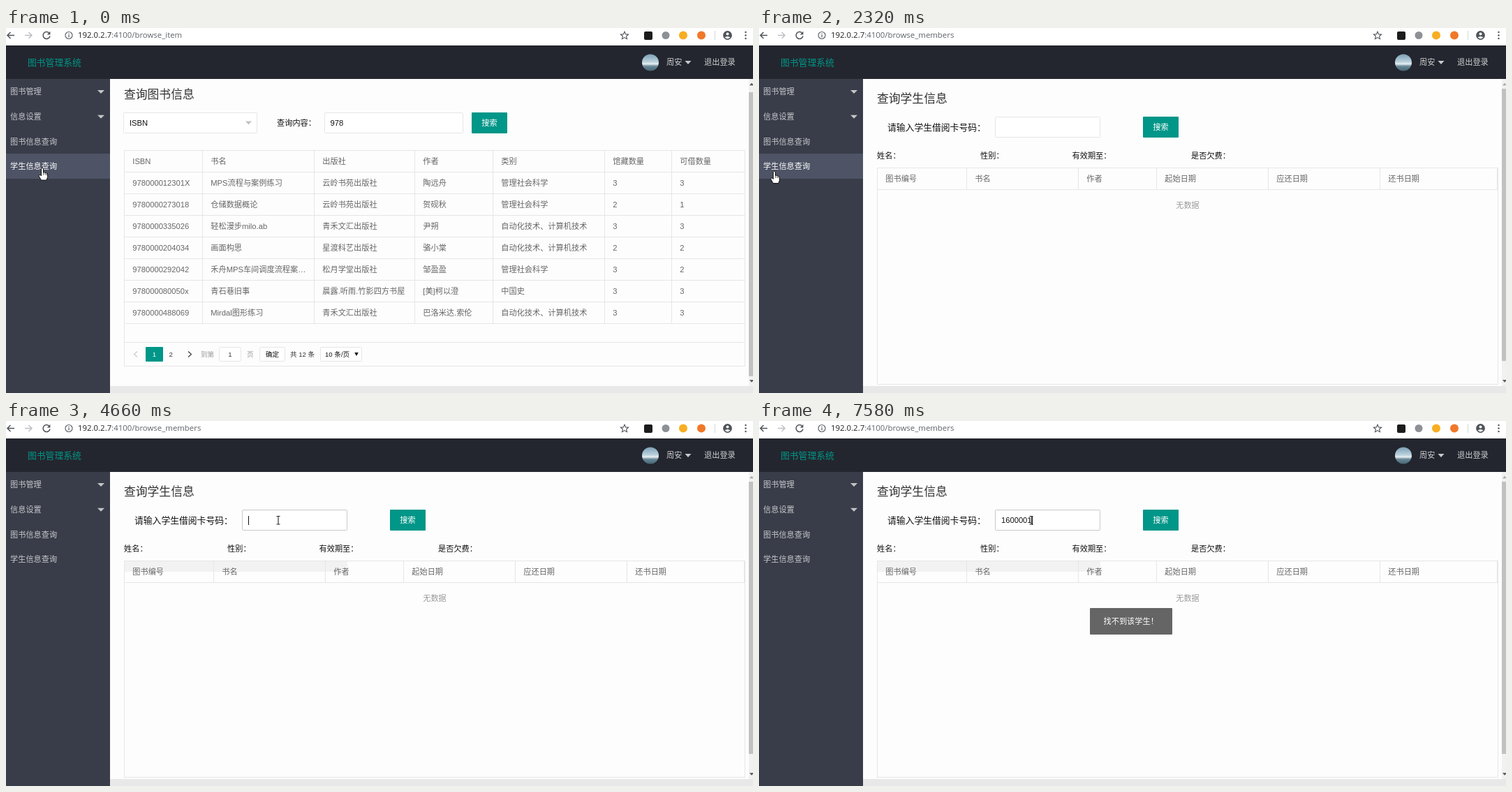
An HTML page for the animation above (8 s loop, 1070 by 523 pixels).

```html
<!DOCTYPE html>
<html lang="zh-CN">
<head>
<meta charset="utf-8">
<title>图书管理系统</title>
<style>
  html, body { margin: 0; width: 100%; height: 100%; overflow: hidden; background: #fdfdfd; }
  svg { display: block; }
  text { font-family: "Liberation Sans", "Noto Sans CJK SC", "Noto Sans CJK", sans-serif; white-space: pre; }
  .url { font-family: "Open Sans", "Noto Sans", sans-serif; }
</style>
</head>
<body>
<svg id="stage" width="1070" height="523" viewBox="0 0 1070 523"></svg>
<script>
const LOOP = 8000;
const LINE = '#e6e6e6', GREEN = '#009688', SIZE = 11.2;

// Drawing helpers; text is placed by its vertical centre.
const rect = (x, y, w, h, fill, extra = '') =>
  `<rect x="${x}" y="${y}" width="${w}" height="${h}" fill="${fill}" ${extra}/>`;
const text = (x, cy, s, fill = '#666', size = SIZE, extra = '') =>
  `<text x="${x}" y="${cy + size * 0.37}" font-size="${size}" fill="${fill}" ${extra}>${s}</text>`;
const mid = (x, cy, s, fill, size) => text(x, cy, s, fill, size, 'text-anchor="middle"');
const box = (x, y, w, h, id = '') =>
  rect(x + .5, y + .5, w - 1, h - 1, '#fff', `rx="1" stroke="${LINE}" ${id}`);
const frame = (x, y, w, h) => rect(x + .5, y + .5, w - 1, h - 1, 'none', `stroke="${LINE}"`);
const path = (d, stroke, w = 1.5, fill = 'none') =>
  `<path d="${d}" stroke="${stroke}" stroke-width="${w}" fill="${fill}"/>`;
const down = (x, y, w, h, fill) =>
  `<path d="M${x - w / 2} ${y - h / 2}h${w}l${-w / 2} ${h}z" fill="${fill}"/>`;
const up = (x, y, w, h, fill) => down(x, y, w, -h, fill);
const dot = (x, y, r, fill, extra = '') => `<circle cx="${x}" cy="${y}" r="${r}" fill="${fill}" ${extra}/>`;
const group = (id, s) => `<g id="${id}">${s}</g>`;
const button = (x, y) => rect(x, y, 51, 30, GREEN, 'rx="1"') + mid(x + 25.5, y + 15, '搜索', '#fff');
const url = (id, page) =>
  `<text id="${id}" class="url" x="103" y="14.3" font-size="11.4" fill="#202124">192.0.2.7<tspan fill="#5f6368">:4100/${page}</tspan></text>`;

function toolbar() {
  return rect(0, 0, 1070, 25, '#fff') +
    path('M12 10.5H2M6.5 6L2 10.5L6.5 15', '#50545a') +
    path('M27 10.5H37M32.5 6L37 10.5L32.5 15', '#bdc0c4') +
    group('reload', path('M62.2 7.6A5 5 0 1 0 63 11.5', '#50545a') +
      '<path d="M63.4 4.8v4.6h-4.6z" fill="#50545a"/>') +
    group('stop', path('M54 6.2L62.4 14.6M62.4 6.2L54 14.6', '#50545a')) +
    dot(90, 10.5, 5, 'none', 'stroke="#5f6368" stroke-width="1.2"') +
    rect(89.4, 9.7, 1.3, 3.6, '#5f6368') + rect(89.4, 7.6, 1.3, 1.3, '#5f6368') +
    url('urlBooks', 'browse_item') + url('urlStudents', 'browse_members') +
    path('M886 5.2l1.6 3.7 4 .3-3 2.6.9 3.9-3.5-2.1-3.5 2.1.9-3.9-3-2.6 4-.3z', '#50545a', 1.1) +
    rect(914, 5, 12, 12, '#1c1c1c', 'rx="2"') +
    dot(945, 10.5, 5.5, '#8d9094') + dot(970, 10.5, 6, '#f8ae22') + dot(996, 10.5, 6, '#f0782a') +
    rect(1015, 4, 1, 13, '#d5d7da') +
    dot(1033.5, 10.5, 6.4, '#50545a') + dot(1033.5, 8.5, 2, '#fff') +
    '<path d="M1029.5 13.6q4-3 8 0q-4 3.6-8 0z" fill="#fff"/>' +
    [6, 10.5, 15].map(y => dot(1059.5, y, 1.2, '#50545a')).join('');
}

function header() {
  return rect(0, 25, 1070, 48, '#23262e') +
    text(31, 49, '图书管理系统', GREEN, 12.8) +
    `<linearGradient id="sky" x2="0" y2="1">
      <stop offset="0" stop-color="#7c9fb5"/><stop offset=".45" stop-color="#b9d0dc"/>
      <stop offset=".58" stop-color="#e6eef1"/><stop offset=".72" stop-color="#688797"/>
      <stop offset="1" stop-color="#476675"/></linearGradient>` +
    dot(923, 49.5, 12, 'url(#sky)') +
    text(946, 49, '周安', '#d0d1d3') + down(977, 49.5, 9, 5, '#c8c9cb') +
    text(1000, 49, '退出登录', '#d0d1d3');
}

function sidebar() {
  const items = ['图书管理', '信息设置', '图书信息查询', '学生信息查询'];
  return rect(0, 73, 149, 450, '#393d49') +
    rect(0, 180, 149, 36, '#4e5465', 'id="hover"') +
    items.map((s, i) => text(6, 91 + i * 35.7, s, '#c8c9cc', SIZE, `id="item${i}"`) +
      (i < 2 ? down(136, 91.5 + i * 35.7, 10, 5, '#c4c5c8') : '')).join('');
}

function scrollbar(y, h, upFill) {
  return rect(1064, 73, 6, 440, '#f1f1f1') + rect(1064, y, 6, h, '#c1c1c1') +
    up(1068, 80.5, 6, 3.5, upFill) + down(1068, 506, 6, 3.5, '#505050');
}

function pager() {
  const t = (x, s, fill = '#333') => text(x, 467.5, s, fill, 9.6);
  return path('M188 463.5L183.5 467.5L188 471.5', '#c8c8c8', 1.1) +
    rect(200, 457, 25, 21, GREEN, 'rx="1"') + mid(212.5, 467.5, '1', '#fff', 9.6) +
    t(233.5, '2') + path('M261 463.5L265.5 467.5L261 471.5', '#333', 1.1) +
    t(279, '到第', '#999') + box(305, 457, 32, 21) + mid(321, 467.5, '1', '#333', 9.6) +
    t(345, '页', '#999') + box(363, 457, 37, 21) + mid(381.5, 467.5, '确定', '#111', 9.6) +
    t(407, '共 12 条') + box(450, 457, 60, 21) + t(457, '10 条/页', '#111') +
    down(502, 467.5, 5.5, 5, '#111');
}

function booksPage() {
  const cols = [169, 281, 441, 585, 697, 857, 953];
  const social = '管理社会科学', auto = '自动化技术、计算机技术';
  const rows = [
    ['ISBN', '书名', '出版社', '作者', '类别', '馆藏数量', '可借数量'],
    ['978000012301X', 'MPS流程与案例练习', '云岭书苑出版社', '陶远舟', social, 3, 3],
    ['9780000273018', '仓储数据概论', '云岭书苑出版社', '贺砚秋', social, 2, 1],
    ['9780000335026', '轻松漫步milo.ab', '青禾文汇出版社', '尹朔', auto, 3, 3],
    ['9780000204034', '画面构思', '星渡科艺出版社', '骆小棠', auto, 2, 2],
    ['9780000292042', '禾舟MPS车间调度流程案…', '松月学堂出版社', '邹盈盈', social, 3, 2],
    ['978000080050x', '青石巷旧事', '晨露.听雨.竹影四方书屋', '[美]柯以澄', '中国史', 3, 3],
    ['9780000488069', 'Mirdal图形练习', '青禾文汇出版社', '巴洛米达.索伦', auto, 3, 3],
  ];
  return text(169, 95, '查询图书信息', '#333', 16.8) +
    box(168, 121, 192, 30) + text(177, 136, 'ISBN', '#111') + down(347.5, 136, 9, 5, '#c2c2c2') +
    text(388, 136, '查询内容：', '#111') + box(456, 121, 199, 30) + text(464.5, 136, '978', '#111') +
    button(667, 121) +
    frame(169, 175, 890, 310) +
    rows.map((row, r) => rect(169, 206 + r * 31, 889, 1, LINE) +
      row.map((s, c) => text(cols[c] + 12.3, 191 + r * 31, s)).join('')).join('') +
    cols.slice(1).map(x => rect(x, 175, 1, 249, LINE)).join('') +
    rect(169, 450, 889, 1, LINE) + pager() + scrollbar(92, 407, '#505050');
}

function studentsPage() {
  const cols = [169, 297, 457, 569, 729, 889];
  const heads = ['图书编号', '书名', '作者', '起始日期', '应还日期', '还书日期'];
  const facts = [[169, '姓名：'], [317, '性别：'], [448.5, '有效期至：'], [619, '是否欠费：']];
  return text(169, 101, '查询学生信息', '#333', 16.8) +
    text(184, 142, '请输入学生借阅卡号码：', '#111', 12.8) +
    box(338, 127, 151, 30, 'id="field"') + button(550, 127) +
    facts.map(([x, s]) => text(x, 183, s, '#111')).join('') +
    rect(169, 201, 320, 15, '#f2f2f2', 'id="strip"') +
    frame(169, 200, 890, 311) + rect(169, 231, 889, 1, LINE) +
    cols.slice(1).map(x => rect(x, 200, 1, 32, LINE)).join('') +
    rect(1057, 200, 1, 32, LINE) +
    heads.map((s, i) => text(cols[i] + 12.3, 216, s)).join('') +
    mid(614, 254, '无数据', '#999') + scrollbar(87, 390, '#a8a8a8') +
    text(347, 142, '', '#111', SIZE, 'id="typed"') + rect(347, 136, 1, 13, '#111', 'id="caret"') +
    group('toast', rect(474, 268, 118, 38, '#000', 'rx="1" fill-opacity=".6"') +
      text(493.5, 287, '找不到该学生！', '#fff'));
}

const pointers =
  group('hand', path('M-1.5 1Q0-1 1.5 1V6.5Q3 5.5 4 7Q5.5 6.3 6 7.8Q7.6 7.4 7.6 9.5V13L6 17.5H-1.5L-5 11.5Q-5 9.3-3 10L-1.5 11.5Z', '#111', 1, '#fff') +
    path('M1.5 6.5V10M4 7.5V10M6 8.5V10.5', '#111', .7)) +
  group('arrow', path('M0 0V14L3.2 11L5.4 16L7.6 15L5.4 10.2H9.8Z', '#111', 1, '#fff')) +
  group('beam', path('M-2.5-5.5H-.6L0-5L.6-5.5H2.5M0-5V5.5M-2.5 6H-.6L0 5.5L.6 6H2.5', '#222', 1.1));

document.getElementById('stage').innerHTML =
  rect(0, 0, 1070, 523, '#fdfdfd') +
  group('books', booksPage()) + group('students', studentsPage()) +
  rect(149, 513, 921, 10, '#e8e8e8') + sidebar() + header() + toolbar() +
  group('pointer', pointers);

const ui = {};
document.querySelectorAll('[id]').forEach(el => ui[el.id] = el);

// Step tables: [time, value]; the last passed entry holds.
const CLICK = 1490, PAGE = 1580, LOADED = 1780, LEAVE = 2970, FOCUS = 3210, TOAST = 7240;
const typing = [[0, 0], [4770, 1], [4880, 2], [5750, 3], [5940, 4], [6120, 5], [6350, 6], [6530, 7]];
const blink = [[0, 0], [3540, 1], [4100, 0], [4660, 1], [5430, 0], [5750, 1], [7090, 0], [7580, 1]];
const caretX = [347, 353, 359, 365, 371, 378, 384, 391];
const moves = [[0, 52, 200.5], [2140, 52, 200.5], [2320, 22, 205], [2390, 13, 204], [2500, 42, 191],
  [2620, 92, 184], [2760, 152, 196], [2910, 213, 213], [2970, 250, 196], [3130, 338, 157],
  [3270, 390, 142], [LOOP, 390, 142]];

const held = (steps, t) => steps.filter(s => s[0] <= t).pop()[1];
const show = (el, on) => el.style.display = on ? '' : 'none';

function pointerAt(t) {
  const i = moves.findIndex(m => m[0] > t);
  const [t0, x0, y0] = moves[i - 1], [t1, x1, y1] = moves[i];
  const k = (t - t0) / (t1 - t0);
  return [x0 + (x1 - x0) * k, y0 + (y1 - y0) * k];
}

function draw(t) {
  const students = t >= PAGE;
  show(ui.books, !students);
  show(ui.urlBooks, !students);
  show(ui.students, students);
  show(ui.urlStudents, students);

  const loading = t >= CLICK && t < LOADED;
  show(ui.stop, loading);
  show(ui.reload, !loading);

  show(ui.hover, t < LEAVE);
  ui.hover.setAttribute('fill', t >= CLICK && t < PAGE ? '#336b70' : '#4e5465');
  ui.item3.setAttribute('fill', t < LEAVE ? '#fff' : '#c8c9cc');
  show(ui.strip, t >= LEAVE);
  ui.field.setAttribute('stroke', t >= FOCUS ? '#c9c9c9' : LINE);

  const count = held(typing, t);
  ui.typed.textContent = '1600001'.slice(0, count);
  ui.caret.setAttribute('x', caretX[count]);
  show(ui.caret, held(blink, t));

  const [x, y] = pointerAt(t);
  ui.pointer.setAttribute('transform', `translate(${x.toFixed(1)} ${y.toFixed(1)})`);
  const inField = x > 338 && y < 157;
  show(ui.hand, x < 149);
  show(ui.arrow, x >= 149 && !inField);
  show(ui.beam, inField);

  const k = Math.min(1, Math.max(0, (t - TOAST) / 320));
  const ease = 1 - (1 - k) ** 2;
  show(ui.toast, t >= TOAST);
  ui.toast.setAttribute('opacity', ease);
  ui.toast.setAttribute('transform', `translate(533 287) scale(${.5 + ease / 2}) translate(-533 -287)`);
}

const start = performance.now();
function tick() {
  draw((performance.now() - start) % LOOP);
  requestAnimationFrame(tick);
}
tick();
</script>
</body>
</html>
```
